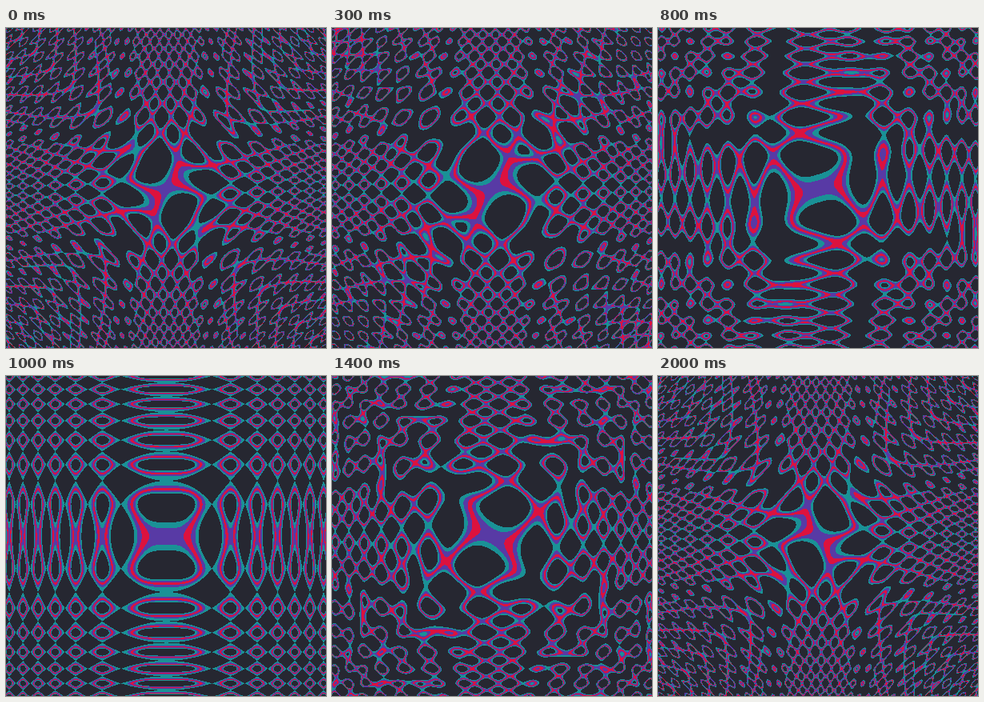
Recreate the animation shown at these times as an HTML page with a canvas. Size 400 by 400 pixels, loop 2.1 s.

```html
<!DOCTYPE html>
<html lang="en">
<head>
<meta charset="utf-8">
<title>Wave field</title>
<style>
  html, body { margin: 0; width: 100%; height: 100%; overflow: hidden; background: #262731; }
  canvas { display: block; width: 400px; height: 400px; }
</style>
</head>
<body>
<canvas id="stage" width="400" height="400"></canvas>
<script>
const SIZE = 400, UNIT = 32, STEP = 100, STEPS = 21;
const ctx = document.getElementById('stage').getContext('2d');
const image = ctx.createImageData(SIZE, SIZE);
const pixels = new Uint32Array(image.data.buffer);

const rgb = (r, g, b) => (255 << 24 | b << 16 | g << 8 | r) >>> 0;
const DARK = rgb(38, 39, 49), TEAL = rgb(26, 145, 150);
const PURPLE = rgb(88, 58, 165), RED = rgb(220, 18, 62);

// Upper limit of each colour band of the field; everything outside is dark.
const bands = [[0, DARK], [0.3, TEAL], [0.6, PURPLE], [0.9, RED], [1.1, PURPLE], [1.3, TEAL]];

function colorOf(value) {
  for (const [limit, color] of bands) if (value < limit) return color;
  return DARK;
}

// Pixel positions in field units, measured from the middle of the stage.
const axis = Float64Array.from({ length: SIZE }, (_, i) => (i - SIZE / 2) / UNIT);
const cosX = axis.map(x => Math.cos(x * x));
const sinY = axis.map(y => Math.sin(y * y));

// Field: sin(y²) + cos(x²) + sin(twist·x·y)
function draw(twist) {
  let p = 0;
  for (let j = 0; j < SIZE; j++) {
    const k = twist * axis[j];
    for (let i = 0; i < SIZE; i++) {
      pixels[p++] = colorOf(sinY[j] + cosX[i] + Math.sin(k * axis[i]));
    }
  }
  ctx.putImageData(image, 0, 0);
}

const start = performance.now();
let shown = -1;

function tick() {
  const step = Math.floor((performance.now() - start) / STEP) % STEPS;
  if (step !== shown) {
    shown = step;
    draw((10 - step) * 0.3);
  }
  requestAnimationFrame(tick);
}
tick();
</script>
</body>
</html>
```
